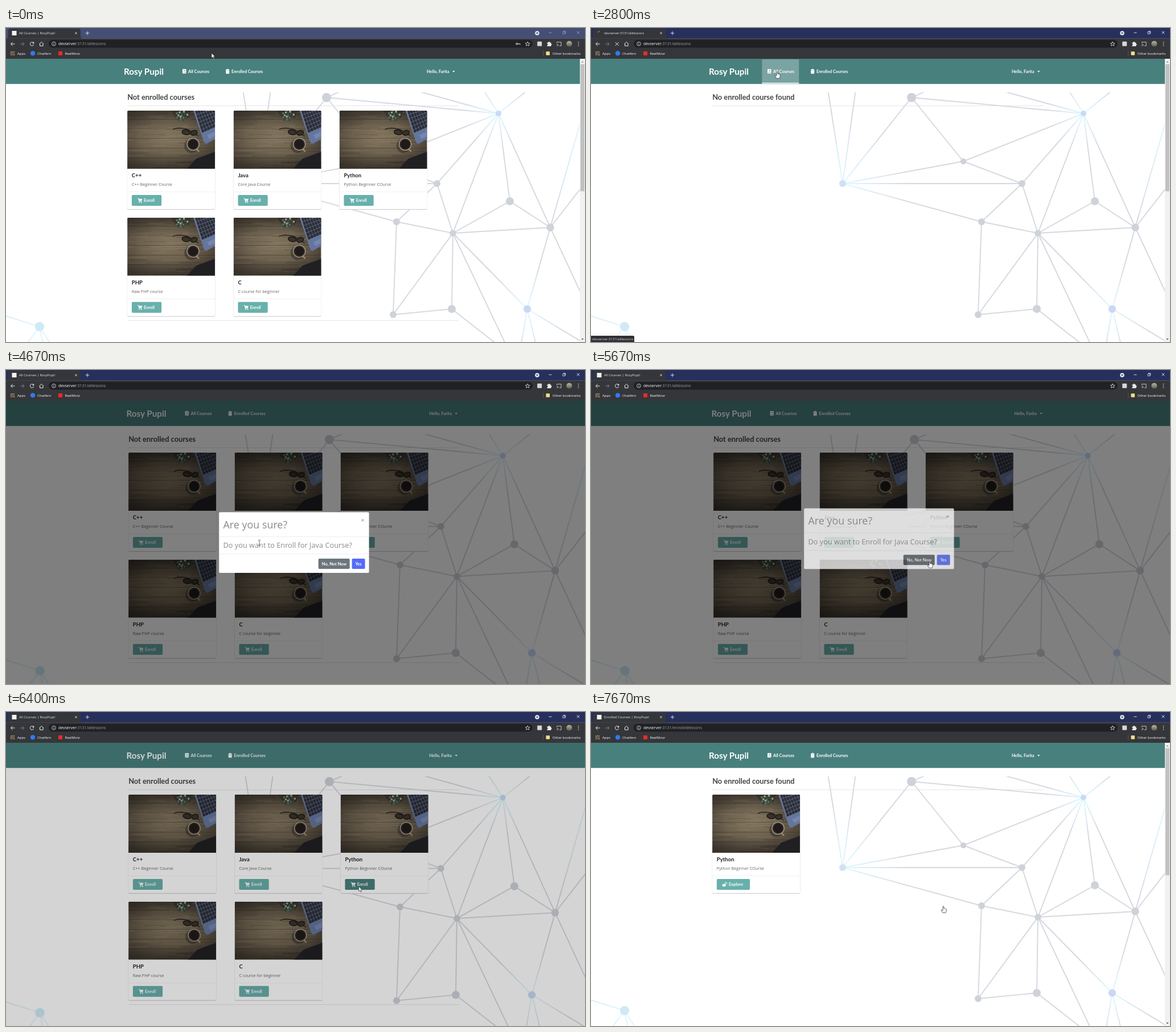
Recreate the animation shown at these times as an HTML page. Size 1017 by 551 pixels, loop 8000 ms.

```html
<!DOCTYPE html>
<html lang="en">
<head>
<meta charset="utf-8">
<title>Course enrolment</title>
<style>
  html, body { margin: 0; width: 100%; height: 100%; overflow: hidden; background: #fff; }
  svg { display: block; width: 1017px; height: 551px; }
  text { white-space: pre; }
  .ui { font-family: "Open Sans", "Noto Sans", sans-serif; }
  .lato { font-family: Lato, "Open Sans", sans-serif; font-weight: 700; }
</style>
</head>
<body>
<svg id="stage" viewBox="0 0 1017 551" xmlns="http://www.w3.org/2000/svg"></svg>
<script>
const LOOP = 8000;
const TEAL = '#48807e', MINT = '#68b0ab', BAR = '#35363a', ICON = '#e8eaed';
const BRAND = 'RosyPupil', HOST = 'devserver', PORT = ':3131/';

// ---- markup helpers ----
const rect = (x, y, w, h, fill, rx = 0, more = '') =>
  `<rect x="${x}" y="${y}" width="${w}" height="${h}" rx="${rx}" fill="${fill}" ${more}/>`;
const circle = (x, y, r, fill, more = '') => `<circle cx="${x}" cy="${y}" r="${r}" fill="${fill}" ${more}/>`;
const line = (d, stroke, w = 1, more = '') =>
  `<path d="${d}" fill="none" stroke="${stroke}" stroke-width="${w}" ${more}/>`;
const shape = (d, fill, more = '') => `<path d="${d}" fill="${fill}" ${more}/>`;
const text = (x, y, s, size, fill, cls = 'ui', more = '') =>
  `<text x="${x}" y="${y}" font-size="${size}" fill="${fill}" class="${cls}" ${more}>${s}</text>`;
const group = (id, body, more = '') => `<g id="${id}" ${more}>${body}</g>`;

// ---- network backdrop: x, y, radius, colour and glow radius of the bright nodes ----
const NODES = {
  A: [563, 122, 8], B: [654, 234, 5.2], C: [442, 273, 6, '#cfe2f4', 110], D: [757, 273, 6],
  E: [686, 340, 6], F: [785, 360, 5.8], G: [865, 150, 5, '#c8daf6', 62], H: [885, 304, 7],
  I: [956, 350, 6.7], J: [680, 503, 6], K: [783, 493, 7], L: [915.5, 493, 6.6, '#cbd7f5', 75],
  M: [59, 524, 8.2, '#cfeaf6', 120], N: [1014, 148, 0, '#fff', 190]
};
const LINKS = 'AB AC AG BG BC BD CD CE DE DF DG EF EJ FG FH FI FJ FK FL GH GI HI IL JK IN'.split(' ');
const RAYS = [['A', 588, 111], ['C', 416, 108], ['C', 465, 108], ['G', 724, 111], ['G', 838, 108],
  ['G', 915, 110], ['I', 1020, 268], ['I', 1020, 487], ['F', 880, 560], ['K', 870, 561],
  ['L', 904, 560], ['L', 932, 560], ['L', 1020, 556], ['M', -5, 504], ['M', 32, 560], ['M', 82, 560], ['M', 66, 560]];

function network() {
  const glows = Object.keys(NODES).filter(k => NODES[k][4]);
  const defs = glows.map(k => `<radialGradient id="glow${k}" gradientUnits="userSpaceOnUse"
    cx="${NODES[k][0]}" cy="${NODES[k][1]}" r="${NODES[k][4]}"><stop offset=".1" stop-color="#dcf7fd"/>
    <stop offset=".55" stop-color="#dbeaf4"/><stop offset="1" stop-color="#d6d8df"/></radialGradient>`).join('');
  const paint = (a, b) => {
    const k = [a, b].find(n => glows.includes(n));
    return k ? `url(#glow${k})` : '#d6d8df';
  };
  const edge = (a, x, y, b) => line(`M${NODES[a][0]} ${NODES[a][1]}L${x} ${y}`, paint(a, b), 1.9);
  return `<defs>${defs}</defs>` +
    LINKS.map(([a, b]) => edge(a, NODES[b][0], NODES[b][1], b)).join('') +
    RAYS.map(([a, x, y]) => edge(a, x, y)).join('') +
    Object.values(NODES).map(([x, y, r, c]) => circle(x, y, r, c || '#ced2d9')).join('');
}

// ---- desk picture used on every card ----
function desk() {
  let seed = 7, s = rect(0, 0, 154, 102, 'url(#wood)');
  const rnd = () => (seed = seed * 16807 % 2147483647) / 2147483647;
  for (let i = 0; i < 70; i++) {
    s += rect((rnd() * 150 - 25).toFixed(1), (rnd() * 102).toFixed(1), (18 + rnd() * 45).toFixed(1),
      (.8 + rnd() * 2).toFixed(1), i % 2 ? '#a3947b' : '#2e271f', 1, 'opacity=".17"');
  }
  for (let y = 15; y < 102; y += 17) s += line(`M0 ${y}H154`, '#231e18', .7, 'opacity=".55"');
  s += rect(0, 0, 154, 102, 'url(#shade)');
  s += shape('M76 0H112L108 13L88 16Z', '#2a2a26', 'opacity=".55"');
  for (let i = 0; i < 16; i++) {
    const a = i * 2.4, r = 2.5 * Math.sqrt(i);
    s += circle((95.5 + r * 1.15 * Math.cos(a)).toFixed(1), (9 + r * Math.sin(a)).toFixed(1), 1.9,
      ['#566f60', '#8ea295', '#3a4f43'][i % 3]);
  }
  s += shape('M116 0H154V50L141 57Q136 59 134 54Z', '#64769d') +
    shape('M119 0H154V29L131 39Z', '#2a2d37');
  for (let i = 0; i < 6; i++) s += line(`M${118 + i * 2.4} ${1 + i * 6.5}L154 ${-10 + i * 6.5}`, '#7e8aa6', .6);
  for (let i = 0; i < 7; i++) s += line(`M${118 + i * 5} 0L${131 + i * 5} ${39 - i * 2}`, '#7e8aa6', .5);
  s += shape('M140 43L153 37V45L144 50Z', '#7686ad');
  s += line('M80 33Q90 28 106 33L125 45', '#211d19', 1.4) +
    `<g fill="#38322a" stroke="#1b1815" stroke-width="1.5"><ellipse cx="103" cy="38" rx="7" ry="4.2" transform="rotate(12 103 38)"/>
     <ellipse cx="117" cy="39" rx="6" ry="4.2" transform="rotate(-16 117 39)"/></g>`;
  s += circle(112, 62, 12, '#211c17', 'opacity=".4"') + line('M121 67L126 72', '#b08a52', 2.2) +
    circle(115.5, 59, 11.2, '#a8a198') + circle(115.5, 59, 10, '#352e29') + circle(115.5, 59, 8, '#1f1a18');
  s += shape('M104 102L121 84L154 72V102Z', '#201f22') + line('M104 102L121 84L154 72', '#45413e', .6);
  return s;
}

const cart = (x, y) =>
  line(`M${x} ${y}h1.6l1.5 5.3h4.4`, '#fff', 1) +
  shape(`M${x + 1.9} ${y + .8}h6.5l-1 3.4h-4.6z`, '#fff') +
  circle(x + 3.3, y + 7, .9, '#fff') + circle(x + 7, y + 7, .9, '#fff');
const unlock = (x, y) => rect(x, y + 3, 5.6, 4.2, '#fff', .6) +
  line(`M${x + 4.3} ${y + 3}v-1.2a1.7 1.7 0 0 1 3.4 0v1.6`, '#fff', 1);

function card(x, y, name, about, id, label = 'Enroll') {
  const explore = label === 'Explore';
  return `<g transform="translate(${x} ${y})">` +
    rect(0, .7, 154, 173.3, '#cfd0d2', 2) + rect(-.4, 0, 154.8, 173, '#dcdddf', 2) + rect(0, 0, 154, 172.8, '#fff', 2) +
    '<use href="#desk"/>' +
    text(7.7, 117.3, name, 9.55, '#222', 'lato') +
    text(7.7, 132.2, about, 7.25, '#666') +
    rect(0, 142.2, 154, .6, '#e8e8e8') +
    rect(7.8, 148, explore ? 58.2 : 52.2, 19, MINT, 1.8, `id="${id}"`) +
    (explore ? unlock : cart)(17.8, 154) +
    text(29, 160.2, label, 7.42, '#fff', 'lato') + '</g>';
}

const heading = s => text(213.2, 125.8, s, 12.82, '#454545', 'lato');
const COLS = [213.1, 399.7, 585.7];
const list = heading('Not enrolled courses') +
  card(COLS[0], 145, 'C++', 'C++ Beginner Course', 'btnCpp') +
  card(COLS[1], 145, 'Java', 'Core Java Course', 'btnJava') +
  card(COLS[2], 145, 'Python', 'Python Beginner COurse', 'btnPython') +
  card(COLS[0], 332.7, 'PHP', 'Raw PHP course', 'btnPhp') +
  card(COLS[1], 332.7, 'C', 'C course for beginner', 'btnC') +
  rect(213.3, 513, 582, .7, '#dcdcdc');
const none = heading('No enrolled course found');

const navHover = (id, x, w) => group(id, rect(x, 55, w, 43, '#fff', 0, 'opacity=".27"') + rect(x, 96, w, 1.4, '#fff'));
const nav = rect(0, 54, 1017, 44.2, TEAL) + group('navItems',
  navHover('hoverAll', 300.3, 65) + navHover('hoverMine', 376, 85) +
  text(207, 82, 'Rosy Pupil', 15.2, '#fff', 'lato') +
  rect(310, 72, 6.6, 8, '#fff', 1) + line('M311 78.3h5.6M312.3 74h3M312.3 75.5h3', TEAL, .6) +
  text(320, 79, 'All Courses', 7.42, '#fff', 'lato') +
  rect(386.2, 72.8, 6, 7.4, '#fff', .8) + rect(387.8, 71.8, 2.8, 2, '#fff', .6) + line('M387.6 74.6h3.2', TEAL, .5) +
  text(396, 79, 'Enrolled Courses', 7.42, '#fff', 'lato') +
  text(739, 79, 'Hello, Farita', 7.42, '#fff', 'lato') +
  shape('M784 75.2h4.6l-2.3 2.5z', '#fff'));

const scroll = rect(1008, 54, 9, 497, '#f1f1f1') + rect(1009, 63.5, 7, 223, '#c1c1c1') +
  shape('M1010.5 60.5h4l-2-2.3z', '#888') + shape('M1010.5 545h4l-2 2.3z', '#444');

// ---- browser frame ----
const browser = rect(0, 0, 1017, 18.5, '#27305d', 0, 'id="title"') +
  shape('M0 18.5Q4 18 4 14V5Q4 1 8 1H127Q131 1 131 5V14Q131 18 135 18.5Z', BAR) +
  rect(10.5, 5, 8, 8, '#f2f2f2', 0, 'id="favicon"') +
  line('M14.5 6A3 3 0 0 1 17.5 9', '#9aa0a6', .9, 'id="spinner"') +
  text(23, 11, '', 5.85, '#e8eaed', 'ui', 'id="tab"') +
  line('M121.2 7.2l3.6 3.6m0-3.6l-3.6 3.6', ICON, .8) + line('M139.8 9h6.4M143 5.8v6.4', ICON, .9) +
  circle(933, 9, 3.8, '#e2e4ea') + shape('M931 8h4l-2 2.6z', '#27305d') +
  group('controls', line('M953.5 8.3h5', '#fff', .8) + line('M978 6.8h3.6v3.6h-3.6zM979.2 6.6v-1h3.6v3.6h-1', '#fff', .7) +
    line('M1002.7 5.6l4.6 4.6m0-4.6l-4.6 4.6', '#fff', .8)) +
  rect(0, 18.3, 1017, 35.7, BAR) + rect(75, 20.8, 850, 13.8, '#202124', 6.9) +
  line('M15.5 28h-7M11.6 24.8L8.4 28l3.2 3.2', ICON) + line('M25 28h7M28.9 24.8l3.2 3.2l-3.2 3.2', '#7d8085') +
  group('reload', line('M48.2 25.8A3.3 3.3 0 1 0 48.8 29', ICON) + shape('M49.2 24v3.2h-3.2z', ICON)) +
  group('stop', line('M42.6 25l6 6m0-6l-6 6', ICON)) +
  line('M58.5 28.2L62.3 24.6L66.1 28.2M59.6 27.4v4h5.4v-4', ICON) +
  circle(84, 27.8, 3.4, 'none', `stroke="${ICON}" stroke-width=".8"`) + line('M84 27.2v2.6M84 25.6v.9', ICON, .8) +
  text(92, 30.3, '<tspan fill="#fff">' + HOST + '</tspan><tspan id="path"></tspan>', 6.95, '#9aa0a6') +
  group('key', circle(897.3, 27.8, 1.5, 'none', `stroke="${ICON}"`) + line('M898.8 27.8h4.2v1.6', ICON)) +
  line('M916.2 24l1.1 2.6 2.8.2-2.1 1.8.7 2.7-2.5-1.5-2.5 1.5.7-2.7-2.1-1.8 2.8-.2z', ICON, .8) +
  rect(933.2, 23.8, 8, 8, '#d4d8da', 1) +
  shape('M950.5 25.5h2a1.4 1.4 0 0 1 2.8 0h2v2.2a1.3 1.3 0 0 1 0 2.6v1.7h-6.8v-1.9a1.3 1.3 0 0 0 0-2.6z', ICON) +
  line('M967.5 26.5v-1.7h7.6v6.4h-3M967.5 28.4a2.8 2.8 0 0 1 2.8 2.8', ICON, .8) + circle(968, 31, .7, ICON) +
  circle(989.3, 27.8, 5, 'url(#face)') +
  [24.8, 27.8, 30.8].map(y => circle(1005.5, y, .8, ICON)).join('') +
  [0, 1, 2].map(r => [0, 1, 2].map(c => rect(8 + c * 2.7, 41 + r * 2.6, 1.7, 1.7,
    ['#d96a5c', '#e0b252', '#6fa77a'][(r + c) % 3])).join('')).join('') +
  text(20, 46.5, 'Apps', 6, '#fff') + circle(47, 44.4, 4.2, '#2f7bf0') + text(55, 46.5, 'Chatfern', 6, '#fff') +
  rect(92, 41, 7, 7, '#f02a25', 1) + text(103.5, 46.5, 'ReelMoor', 6, '#fff') +
  rect(943, 40, .6, 9, '#6a6b70') + rect(948.5, 41.2, 6.6, 6.6, '#f6dc84', .8) +
  text(960, 46.5, 'Other bookmarks', 6, '#fff');

const modal = rect(374.2, 249.5, 263.4, 106.5, '#fff', 1.8) +
  text(381.5, 277.6, 'Are you sure?', 17.9, '#8b8b8b') +
  line('M624.6 261.7l3.8 3.8m0-3.8l-3.8 3.8', '#777', 1) +
  rect(374.2, 292, 263.4, .6, '#e2e4e6') + rect(374.2, 322.6, 263.4, .6, '#e2e4e6') +
  text(381.5, 312.4, '', 12.75, '#8b8b8b', 'ui', 'id="question"') +
  rect(548.7, 331, 55, 18, '#6c757d', 1.8, 'id="btnNo"') + text(554.8, 342.7, 'No, Not Now', 7.42, '#fff', 'lato') +
  rect(607.6, 331, 23, 18, '#556bf8', 1.8, 'id="btnYes"') + text(613.4, 342.7, 'Yes', 7.42, '#fff', 'lato');

// pointer shapes, hot spot at 0,0
const pointers = group('arrow', shape('M0 0V8.6L2 6.8L3.4 10L4.8 9.4L3.4 6.3H6Z', '#fff', 'stroke="#222" stroke-width=".6"')) +
  group('hand', shape('M-1 .8Q0 -.4 .9 .8V4.2Q2 3.7 2.5 4.5Q3.6 4.2 4 5Q5.2 4.9 5.2 6.2V8.5L4 11.8H-1.2L-3.8 7.6Q-4 6.4 -2.6 6.6L-1 7.8Z',
    '#fff', 'stroke="#222" stroke-width=".7"')) +
  group('beam', line('M-2 -4.6Q0 -4.6 0 -3.6Q0 -4.6 2 -4.6M0 -3.6V4.6M-2 5.2Q0 5.2 0 4.4Q0 5.2 2 5.2', '#555', .9));

document.getElementById('stage').innerHTML = `<defs>
  <radialGradient id="wood" cx=".46" cy=".48" r=".62"><stop offset="0" stop-color="#85775f"/>
    <stop offset=".5" stop-color="#6f6350"/><stop offset="1" stop-color="#453d33"/></radialGradient>
  <linearGradient id="shade" x2="0" y2="1"><stop offset="0" stop-color="#1d1a17" stop-opacity=".4"/>
    <stop offset=".3" stop-color="#1d1a17" stop-opacity="0"/><stop offset=".7" stop-color="#1d1a17" stop-opacity=".05"/>
    <stop offset="1" stop-color="#1d1a17" stop-opacity=".4"/></linearGradient>
  <linearGradient id="face" x2="0" y2="1"><stop offset="0" stop-color="#b9b4a4"/><stop offset="1" stop-color="#5e5a50"/></linearGradient>
  <clipPath id="deskClip"><path d="M0 102V2Q0 0 2 0H152Q154 0 154 2V102Z"/></clipPath>
  <clipPath id="below"><rect y="113" width="1017" height="438"/></clipPath>
  <g id="desk" clip-path="url(#deskClip)">${desk()}</g></defs>` +
  rect(0, 54, 1017, 497, '#fff') +
  `<g clip-path="url(#below)">${group('net', network())}</g>` +
  group('content', rect(213.3, 136.2, 582, .7, '#dcdcdc') + group('list', list) + group('empty', none) +
    group('mine', card(COLS[0], 145, 'Python', 'Python Beginner COurse', 'btnExplore', 'Explore'))) +
  nav + group('scroll', scroll) +
  rect(0, 54, 1017, 497, '#000', 0, 'id="dim"') + group('modal', modal) +
  group('status', shape('M0 540H74Q76 540 76 542V551H0Z', '#2f3034', 'id="bubble"') +
    text(2, 547.7, '', 6.02, '#d5d7da', 'ui', 'id="link"')) +
  browser + group('pointer', pointers);

// ---- timeline ----
const el = {};
document.querySelectorAll('[id]').forEach(n => el[n.id] = n);
const show = (id, on) => el[id].style.display = on ? '' : 'none';
const set = (id, k, v) => el[id].setAttribute(k, v);
const say = (id, s) => { if (el[id].textContent !== s) el[id].textContent = s; };
const at = (t, rows) => rows.reduce((v, r) => t >= r[0] ? r[1] : v, rows[0][1]);
const within = (t, a, b) => t >= a && t < b;
const ramp = (t, a, b) => Math.min(1, Math.max(0, (t - a) / (b - a)));

const ALL = 'alllessons', MINE = 'enrolledlessons';
const MOVES = [[0, 361, 44], [200, 361, 44], [870, 424, 76], [2200, 424, 76], [2600, 327, 76.5],
  [3000, 327, 76.5], [3400, 362, 170], [3850, 429, 298], [4600, 429, 299], [4670, 445, 303], [5250, 604, 339],
  [5470, 595, 335.5], [5900, 595, 335.5], [6130, 619.5, 306], [6650, 619.5, 306], [7070, 619, 340.5], [8000, 619, 340.5]];
const KINDS = [[0, 'arrow'], [450, 'hand'], [3080, 'arrow'], [3780, 'hand'], [4045, 'arrow'], [4600, 'beam'],
  [4930, 'arrow'], [5110, 'hand'], [5720, 'arrow'], [6080, 'hand'], [6350, 'arrow'], [6720, 'beam'], [6830, 'arrow'], [7030, 'hand']];
const PAGES = [[0, 'list'], [1600, 'empty'], [3070, 'list'], [7530, 'mine']];
const TABS = [[0, 'All Courses | ' + BRAND], [1270, HOST + PORT + MINE], [1600, 'Enrolled Courses | ' + BRAND],
  [2800, HOST + PORT + ALL], [3070, 'All Courses | ' + BRAND], [7270, HOST + PORT + MINE], [7530, 'Enrolled Courses | ' + BRAND]];
const PATHS = [[0, ALL], [1270, MINE], [2800, ALL], [7400, MINE]];
const LINK = [[0, ''], [530, MINE], [2400, ALL], [3140, '']];

function spot(t) {
  const i = MOVES.findIndex(m => m[0] > t), a = MOVES[i - 1], b = MOVES[i];
  const p = ramp(t, a[0], b[0]), e = p * p * (3 - 2 * p);
  return [a[1] + (b[1] - a[1]) * e, a[2] + (b[2] - a[2]) * e];
}

function draw(t) {
  const loading = within(t, 1270, 1800) || within(t, 2800, 3400) || within(t, 7270, 7640);
  const wide = within(t, 4045, 5920) || within(t, 6350, 7530);
  const page = at(t, PAGES), active = t >= 1130;

  set('title', 'fill', active ? '#27305d' : '#454f76');
  set('controls', 'opacity', active ? 1 : .5);
  show('favicon', !loading); show('spinner', loading);
  show('reload', !loading); show('stop', loading);
  show('key', t < 1270);
  set('spinner', 'transform', `rotate(${t * .36} 14.5 9)`);
  say('tab', at(t, TABS));
  say('path', PORT + at(t, PATHS));

  show('list', page === 'list'); show('empty', page !== 'list'); show('mine', page === 'mine');
  show('scroll', !wide);
  set('net', 'transform', wide ? 'translate(0 -1) scale(1.0089)' : '');
  set('content', 'transform', `translate(${wide ? 2 : 0} 0)`);
  set('navItems', 'transform', `translate(${wide ? 4.5 : 0} 0)`);
  show('hoverMine', within(t, 460, 2370));
  show('hoverAll', within(t, 2430, 3110));
  set('btnJava', 'fill', within(t, 3780, 4250) ? TEAL : MINT);
  set('btnPython', 'fill', within(t, 6080, 6550) ? TEAL : MINT);

  const dim = t < 5600 ? ramp(t, 4045, 4200) : t < 6200 ? 1 - ramp(t, 5770, 5920) : t < 7530 ? ramp(t, 6350, 6500) : 0;
  set('dim', 'opacity', dim / 2);
  const open = t < 5570 ? ramp(t, 4230, 4540) : t < 6200 ? 1 - ramp(t, 5570, 5770) : t < 7530 ? ramp(t, 6510, 6820) : 0;
  const ease = 1 - (1 - open) ** 2;
  show('modal', open > 0);
  set('modal', 'opacity', ease);
  set('modal', 'transform', `translate(0 ${-26 * (1 - ease)})`);
  say('question', `Do you want to Enroll for ${t < 6200 ? 'Java' : 'Python'} Course?`);
  set('btnNo', 'fill', within(t, 5110, 6200) ? '#5a6268' : '#6c757d');
  set('btnYes', 'fill', t >= 7100 ? '#3f53dc' : '#556bf8');

  const link = at(t, LINK);
  show('status', link);
  say('link', link && HOST + PORT + link);
  set('bubble', 'transform', `scale(${link === MINE ? 1.24 : 1} 1)`);

  const kind = at(t, KINDS);
  ['arrow', 'hand', 'beam'].forEach(k => show(k, k === kind));
  set('pointer', 'transform', `translate(${spot(t)})`);
}

const start = performance.now();
function frame(now) {
  draw(Math.max(0, now - start) % LOOP);
  requestAnimationFrame(frame);
}
draw(0);
requestAnimationFrame(frame);
</script>
</body>
</html>
```
